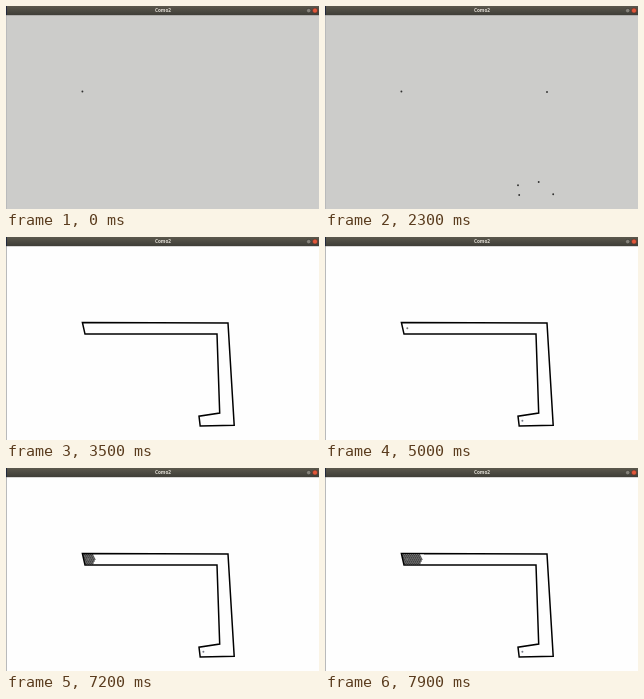
An HTML page for the animation above (8000 ms loop, 313 px wide and 203 px high).

```html
<!DOCTYPE html>
<html lang="en">
<head>
<meta charset="utf-8">
<title>Como2</title>
<style>
html, body { margin: 0; width: 100%; height: 100%; overflow: hidden; background: #ccccca; }
svg { display: block; width: 100%; height: 100%; }
.title { font: bold 4.7px "Open Sans", "Noto Sans", sans-serif; fill: #e2ded6; text-anchor: middle; }
</style>
</head>
<body>
<svg viewBox="0 0 313 203">
  <defs>
    <linearGradient id="bar" x2="0" y2="1">
      <stop offset="0" stop-color="#5b584d"/>
      <stop offset="1" stop-color="#3e3d37"/>
    </linearGradient>
    <clipPath id="inside"><polygon class="outline"/></clipPath>
  </defs>
  <rect id="stage" width="313" height="203"/>
  <rect y="9" width="1" height="194" fill="#b9babb"/>
  <rect width="313" height="9.2" fill="url(#bar)"/>
  <rect width="1" height="9" fill="#20283c"/>
  <text class="title" x="157" y="6.3">Como2</text>
  <circle cx="302.7" cy="4.6" r="2.2" fill="#85827a" stroke="#35342f" stroke-width=".5"/>
  <circle cx="309" cy="4.6" r="2.5" fill="#e2573a" stroke="#4a2f26" stroke-width=".5"/>
  <g id="corners" fill="#30302f"></g>
  <g id="room">
    <g id="search" clip-path="url(#inside)" fill="#aaa" stroke="#161616" stroke-width=".75"></g>
    <polygon class="outline" fill="none" stroke="#000" stroke-width="1.5"/>
    <circle id="start" cx="82.3" cy="91.3" r="1" fill="#777"/>
    <circle id="goal" cx="197.4" cy="183.7" r="1" fill="#777a88"/>
  </g>
</svg>
<script>
const LOOP = 8000, ROOM_AT = 3500, START_AT = 3900, GOAL_AT = 5000;

// x, y, time of the click
const clicks = [
  [76.4, 85.5, 0], [222, 86, 300], [228.2, 188.2, 800], [194.2, 189, 1300],
  [193, 179.2, 1500], [213.7, 176, 2300], [211, 97, 3000], [79, 97.1, 3400]
];

// time, reach of the search front
const reach = [[6200, 1], [6400, 2.6], [6600, 2.6], [7000, 6], [7100, 6], [7200, 6.7], [7900, 15]];

const byId = id => document.getElementById(id);
const show = (el, on) => { el.style.display = on ? "" : "none"; };

function addCircle(parent, cx, cy, r) {
  const el = document.createElementNS("http://www.w3.org/2000/svg", "circle");
  for (const [key, value] of Object.entries({ cx, cy, r })) el.setAttribute(key, value);
  return parent.appendChild(el);
}

const path = clicks.map(([x, y]) => x + "," + y).join(" ");
document.querySelectorAll(".outline").forEach(el => el.setAttribute("points", path));

const corners = clicks.map(([x, y, at]) => ({ at, el: addCircle(byId("corners"), x, y, .95) }));

// Staggered cells, found in order of distance from the start
const cells = [];
for (let row = -2; row <= 2; row++) {
  for (let col = -3; col <= 8; col++) {
    const dx = col * 2 + (row % 2 ? 1 : 0), dy = row * 2;
    const distance = Math.abs(dx) + Math.abs(dy) * .6;
    cells.push({ distance, el: addCircle(byId("search"), 82.3 + dx, 91.3 + dy, .85) });
  }
}

function reachAt(t) {
  if (t < reach[0][0]) return -1;
  for (let i = 1; i < reach.length; i++) {
    const [t0, r0] = reach[i - 1], [t1, r1] = reach[i];
    if (t <= t1) return r0 + (r1 - r0) * (t - t0) / (t1 - t0);
  }
  return reach[reach.length - 1][1];
}

function draw(now) {
  const t = Math.floor((now % LOOP) / 100) * 100;
  const inRoom = t >= ROOM_AT;
  byId("stage").setAttribute("fill", inRoom ? "#fefefe" : "#ccccca");
  show(byId("room"), inRoom);
  show(byId("start"), t >= START_AT);
  show(byId("goal"), t >= GOAL_AT);
  corners.forEach(c => show(c.el, !inRoom && t >= c.at));
  const front = reachAt(t);
  cells.forEach(c => show(c.el, c.distance <= front));
}

const began = performance.now();
function tick() {
  draw(performance.now() - began);
  requestAnimationFrame(tick);
}
tick();
</script>
</body>
</html>
```
